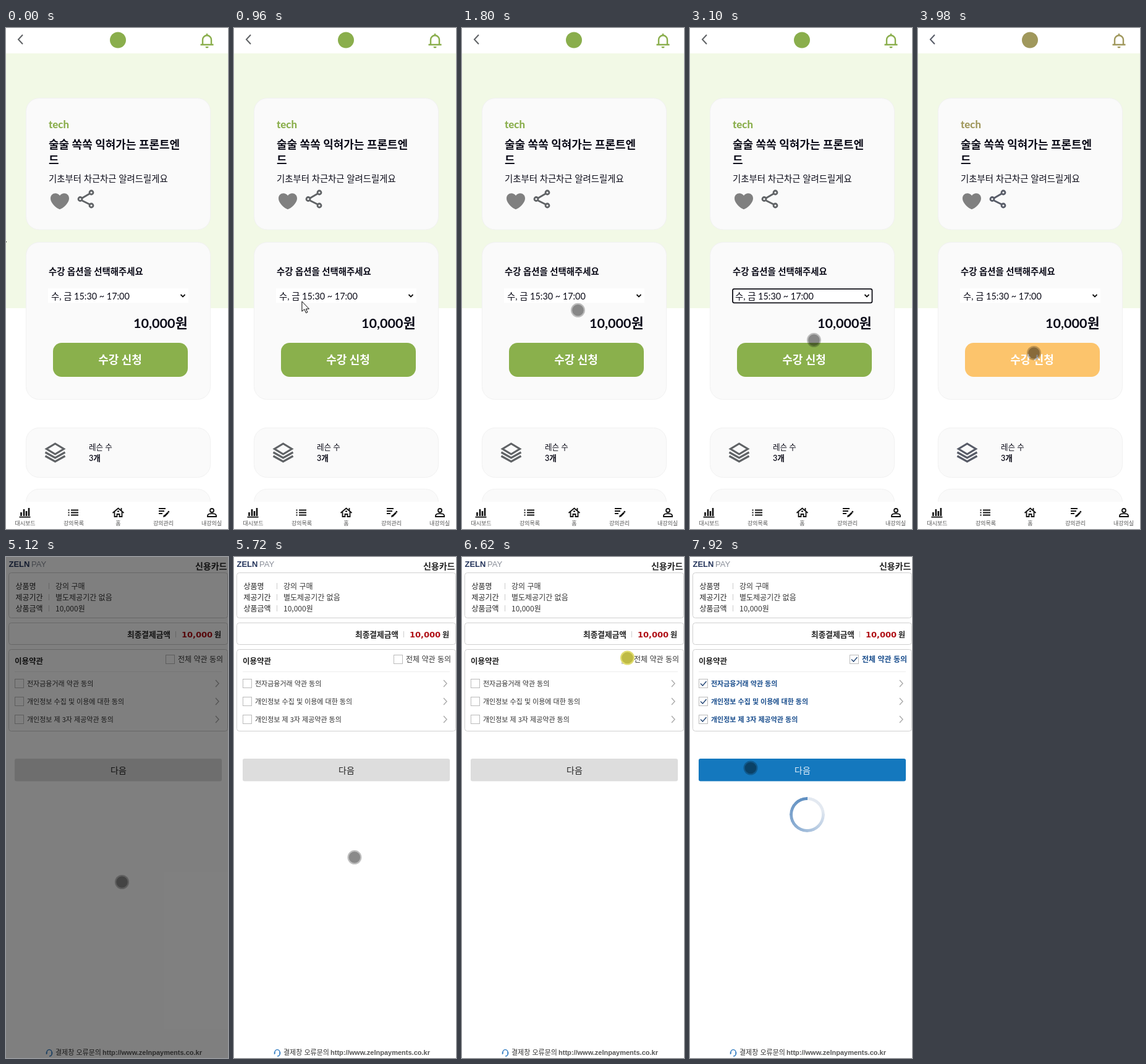
An HTML page that plays this animation: 359x810 px, repeating every 7.99 s.

```html
<!DOCTYPE html>
<html lang="ko">
<head>
<meta charset="utf-8">
<title>수강 신청</title>
<style>
  html, body { margin: 0; width: 100%; height: 100%; overflow: hidden; background: #fff; }
  svg { position: absolute; left: 0; top: 0; display: block; }
  text { white-space: pre; }
  #lesson { --green: #8aae4c; --icon: #606366; font-family: Lato, "Noto Sans CJK KR", sans-serif; fill: #0b0b18; }
  #lesson.warm { --green: #a0985c; --icon: #585c68; }
  .card { fill: #fafafa; stroke: #f1f1f1; }
  .green { fill: var(--green); }
  .line { fill: none; stroke: var(--icon); }
  .nav { font-size: 9px; font-weight: 500; fill: #555; text-anchor: middle; }
  .ink { fill: none; stroke: #111; stroke-width: 1.8; }
  .thick { stroke-width: 2.6; }
  .solid { fill: #111; stroke: none; }
  #pay { font: 12px "Noto Sans CJK KR", sans-serif; fill: #333; }
  .box { fill: #fff; stroke: #d0d0d0; }
  .b { font-weight: 700; }
  .sep { stroke: #ccc; }
  .term { font-size: 11px; }
  .agreed .term, .agreed .all { fill: #1b4f8e; font-weight: 700; }
  .tick { fill: none; stroke: #1b3f70; stroke-width: 1.3; visibility: hidden; }
  .agreed .tick { visibility: visible; }
  #next { fill: #ddd; }
  #nextText { font-size: 14px; fill: #222; text-anchor: middle; }
  .agreed #next { fill: #1478be; }
  .agreed #nextText { fill: #e4f1fb; }
  #spinner {
    position: absolute; left: 160.5px; top: 387.5px; width: 57px; height: 57px; border-radius: 50%;
    background: conic-gradient(#e3e9f1 0 20%, #c3d3e6 35%, #8fb0d4 60%, #5c8dc0);
    mask: radial-gradient(circle, transparent 23px, #000 24px);
    -webkit-mask: radial-gradient(circle, transparent 23px, #000 24px);
  }
</style>
</head>
<body>
<svg width="359" height="810" viewBox="0 0 359 810">
  <g id="lesson">
    <rect width="359" height="810" fill="#fff"/>
    <rect y="41" width="359" height="412" fill="#f2f9e6"/>
    <path class="line" stroke-width="2" d="M27 11l-7 7.5 7 7.5"/>
    <circle class="green" cx="181" cy="19.5" r="13"/>
    <path fill="none" stroke="var(--green)" stroke-width="2.4" d="M314.500 27h21M318 27v-8a7 7 0 0 1 14 0v8M325 9v3"/>
    <path class="green" d="M322.500 30h5a2.500 2.500 0 0 1-5 0z"/>

    <rect class="card" x="32.5" y="113.5" width="298" height="212.5" rx="21"/>
    <rect class="card" x="32.5" y="346.5" width="298" height="254" rx="21"/>
    <rect class="card" x="32.5" y="646.5" width="298" height="80" rx="21"/>
    <rect class="card" x="32.5" y="745.5" width="298" height="80" rx="21"/>

    <text class="green" x="69" y="162" font-size="16.8" font-weight="800">tech</text>
    <g font-size="18" font-weight="600">
      <text x="69" y="194.5">술술 쏙쏙 익혀가는 프론트엔</text>
      <text x="69" y="219.5">드</text>
    </g>
    <text x="69" y="248.5" font-size="14.4">기초부터 차근차근 알려드릴게요</text>
    <path fill="#808080" d="M87 293C84 293 72 284 72 275.500C72 267 82 264.500 87 271C92 264.500 102 267 102 275.500C102 284 90 293 87 293z"/>
    <g class="line" stroke-width="2.8">
      <path d="M135 268l-12 7M123 279l12 6"/>
      <circle cx="138" cy="266" r="3"/><circle cx="120" cy="276.500" r="3"/><circle cx="138" cy="287" r="3"/>
    </g>

    <text x="69" y="398.5" font-size="14.4" font-weight="600">수강 옵션을 선택해주세요</text>
    <rect x="68" y="421" width="227" height="23.5" fill="#fff"/>
    <rect id="ring" x="69" y="421.8" width="225.5" height="22.5" rx="2.5" fill="none" stroke="#101018" stroke-width="1.8"/>
    <text x="73" y="438.5" font-size="14.4">수, 금 15:30 ~ 17:00</text>
    <path class="ink" d="M282.500 431l3.500 3.500 3.500-3.500"/>
    <text class="b" x="293.5" y="485" font-size="21.6" text-anchor="end">10,000원</text>
    <rect id="apply" x="76" y="509" width="218" height="55" rx="14"/>
    <text class="b" x="184.5" y="543" font-size="18" text-anchor="middle" fill="#fff">수강 신청</text>
    <g id="popup">
      <rect x="68" y="446" width="249" height="95" fill="#fff" style="filter:drop-shadow(0 1px 4px #0005)"/>
      <rect x="68" y="447" width="249" height="24" fill="#1967d2"/>
      <text x="73" y="464" font-size="14.4" fill="#fff">수, 금 15:30 ~ 17:00</text>
    </g>

    <path class="line" stroke-width="3.2" d="M79.500 672l14 8.500-14 8.500-14-8.500zM63.500 686l16 9 16-9M63.500 692l16 9 16-9"/>
    <g font-size="12.6">
      <text x="134" y="682" font-weight="500">레슨 수</text>
      <text x="134" y="700" font-weight="600">3개</text>
    </g>

    <rect y="766" width="359" height="44" fill="#fff"/>
    <path class="ink" d="M21.500 790.700h18"/>
    <path class="ink thick" d="M24.500 789v-6M29 789v-11M33 789v-8M37 789v-13"/>
    <path class="ink" d="M105 779.500h12M105 783.500h12M105 787.500h12M100.500 779.500h2M100.500 783.500h2M100.500 787.500h2"/>
    <path class="ink" d="M172.500 784l9-7.500 9 7.500M175.500 782.500v7.500h4v-4h4v4h4v-7.500M186.500 780v-4M180 781.500h3"/>
    <path class="ink" d="M247 777h11M247 781h9M247 785h6"/>
    <path class="ink thick" d="M256.500 789l5.500-5.500"/>
    <path class="solid" d="M254 791l1-4 3 3zM261 782l2-1.500 1.500 1.500-1.500 2z"/>
    <circle class="ink" cx="333" cy="780" r="3"/>
    <path class="ink" d="M326 790v-1.500c0-4.500 14-4.500 14 0v1.500z"/>
    <g class="nav">
      <text x="31" y="803.5">대시보드</text>
      <text x="109.5" y="803.5">강의목록</text>
      <text x="181.5" y="803.5">홈</text>
      <text x="254.5" y="803.5">강의관리</text>
      <text x="332.5" y="803.5">내강의실</text>
    </g>
  </g>

  <g id="pay">
    <rect width="359" height="810" fill="#fff"/>
    <g font-family="Liberation Sans, sans-serif" font-size="13">
      <text class="b" x="4.5" y="16" fill="#26365c">ZELN</text>
      <text x="41" y="16" fill="#8a8f99">PAY</text>
    </g>
    <text class="b" x="357.5" y="19.5" font-size="14" text-anchor="end" fill="#222">신용카드</text>
    <rect class="box" x="4.5" y="25.5" width="354" height="73" rx="4"/>
    <rect class="box" x="4.5" y="106.5" width="354" height="35" rx="4"/>
    <rect class="box" x="4.5" y="149.5" width="354" height="132" rx="4"/>
    <g font-weight="500" fill="#222">
      <text x="15.5" y="51.5">상품명</text><text x="15.5" y="69.5">제공기간</text><text x="15.5" y="87.5">상품금액</text>
    </g>
    <path class="sep" d="M69.500 42v10M69.500 60v10M69.500 78v10M274.500 120v10"/>
    <text x="80" y="51.5">강의 구매</text>
    <text x="80" y="69.5">별도제공기간 없음</text>
    <text x="80" y="87.5">10,000원</text>
    <g class="b" fill="#222">
      <text x="196" y="130" font-size="12.7">최종결제금액</text>
      <text x="284" y="130" font-size="13" font-family="DejaVu Sans, sans-serif" fill="#b01218">10,000</text>
      <text x="337" y="130">원</text>
      <text x="14" y="172.5" font-size="12.5">이용약관</text>
    </g>
    <path stroke="#eee" d="M14 185.500h335"/>
    <text class="all" x="278" y="170">전체 약관 동의</text>
    <g id="terms"></g>
    <rect id="next" x="14" y="326" width="335" height="36.5" rx="3"/>
    <text id="nextText" x="182" y="350">다음</text>
    <path fill="none" stroke="#3b82c4" stroke-width="1.5" d="M66 803v-2a4 4.500 0 0 1 8 0v2a3.500 3.500 0 0 1-4 4M65.500 800v4M74.500 800v4"/>
    <text x="80" y="805" font-size="11">결제창 오류문의</text>
    <text class="b" x="156" y="805" font-size="11" font-family="Liberation Sans, sans-serif" fill="#555">http://www.zelnpayments.co.kr</text>
  </g>
</svg>
<div id="spinner"></div>
<svg width="359" height="810" viewBox="0 0 359 810">
  <g id="touch"><circle id="halo" r="11.5"/><circle id="dot" r="9.3"/></g>
  <path id="arrow" fill="#fff" stroke="#000" stroke-linejoin="round" d="M.500 .500v16l4-3.500 2.500 6 2.500-1-2.500-5.500h5z"/>
  <rect id="dim" width="359" height="810"/>
</svg>
<script>
const LOOP = 7990;
const $ = id => document.getElementById(id);
const show = (id, on) => { $(id).style.display = on ? "" : "none"; };
const within = (t, [from, to]) => t >= from && t < to;

const checkbox = (x, y) => `<rect x="${x + .5}" y="${y + .5}" width="14" height="14" fill="#fff" stroke="#bbb"/>
  <path class="tick" d="M${x + 3} ${y + 7.5}l3.500 3.500 6-7"/>`;
$("terms").innerHTML = checkbox(258, 158) +
  ["전자금융거래 약관 동의", "개인정보 수집 및 이용에 대한 동의", "개인정보 제 3자 제공약관 동의"].map((label, i) => {
    const y = 197 + 29 * i;
    return checkbox(14, y) + `<text class="term" x="34" y="${y + 11.5}">${label}</text>
      <path fill="none" stroke="#aaa" stroke-width="1.4" d="M339 ${y + 2}l5 5.500-5 5.500"/>`;
  }).join("");

// Pointer route: time, x, y
const route = [
  [500, -11.3, 333.5], [880, 90, 425], [1260, 181, 503], [1330, 181, 503], [1400, 179, 511], [1460, 177, 528],
  [1630, 177, 528], [1800, 187.5, 456.5], [1930, 184, 425], [2470, 184, 425], [2680, 195, 462], [2960, 195, 462],
  [3100, 200.5, 504.5], [3330, 187.5, 525.5], [5660, 187.5, 525.5], [6050, 235, 270], [6260, 262, 120],
  [6460, 267.5, 163], [6850, 267.5, 163], [7300, 195, 254.5], [7580, 98, 341]
];
const clicks = [[1930, 2060], [2680, 2810], [3400, 3520], [6560, 6740], [7640, 7770]];

function pointerAt(t) {
  const i = route.findIndex(p => p[0] > t);
  if (i === 0) return route[0].slice(1);
  if (i < 0) return route[route.length - 1].slice(1);
  const [t0, x0, y0] = route[i - 1], [t1, x1, y1] = route[i];
  const k = (t - t0) / (t1 - t0);
  return [x0 + (x1 - x0) * k, y0 + (y1 - y0) * k];
}

function draw(t) {
  const paying = t >= 4920;
  show("lesson", !paying);
  show("pay", paying);
  $("lesson").classList.toggle("warm", t >= 3980);
  $("apply").setAttribute("fill", t >= 3480 ? "#fcc46c" : "#8ab04c");
  show("ring", within(t, [1990, 3480]));
  show("popup", within(t, [2070, 2740]));

  $("pay").classList.toggle("agreed", t >= 6740);
  show("spinner", t >= 7780);
  $("spinner").style.transform = `rotate(${(t - 7920) * .36}deg)`;
  $("dim").setAttribute("fill-opacity", paying ? .5 * Math.min(1, Math.max(0, (5260 - t) / 110)) : 0);

  const isArrow = t < 1390 || within(t, [4450, 4920]);
  const place = `translate(${pointerAt(t)})`;
  const clicking = clicks.some(c => within(t, c));
  show("arrow", isArrow);
  show("touch", !isArrow);
  $("arrow").setAttribute("transform", place);
  $("touch").setAttribute("transform", place);
  $("halo").setAttribute("fill", clicking ? "#e0dc70" : "rgba(0,0,0,.25)");
  $("dot").setAttribute("fill", clicking ? "#bfbb45" : "rgba(0,0,0,.28)");
}

(function frame() {
  draw(performance.now() % LOOP);
  requestAnimationFrame(frame);
})();
</script>
</body>
</html>
```
